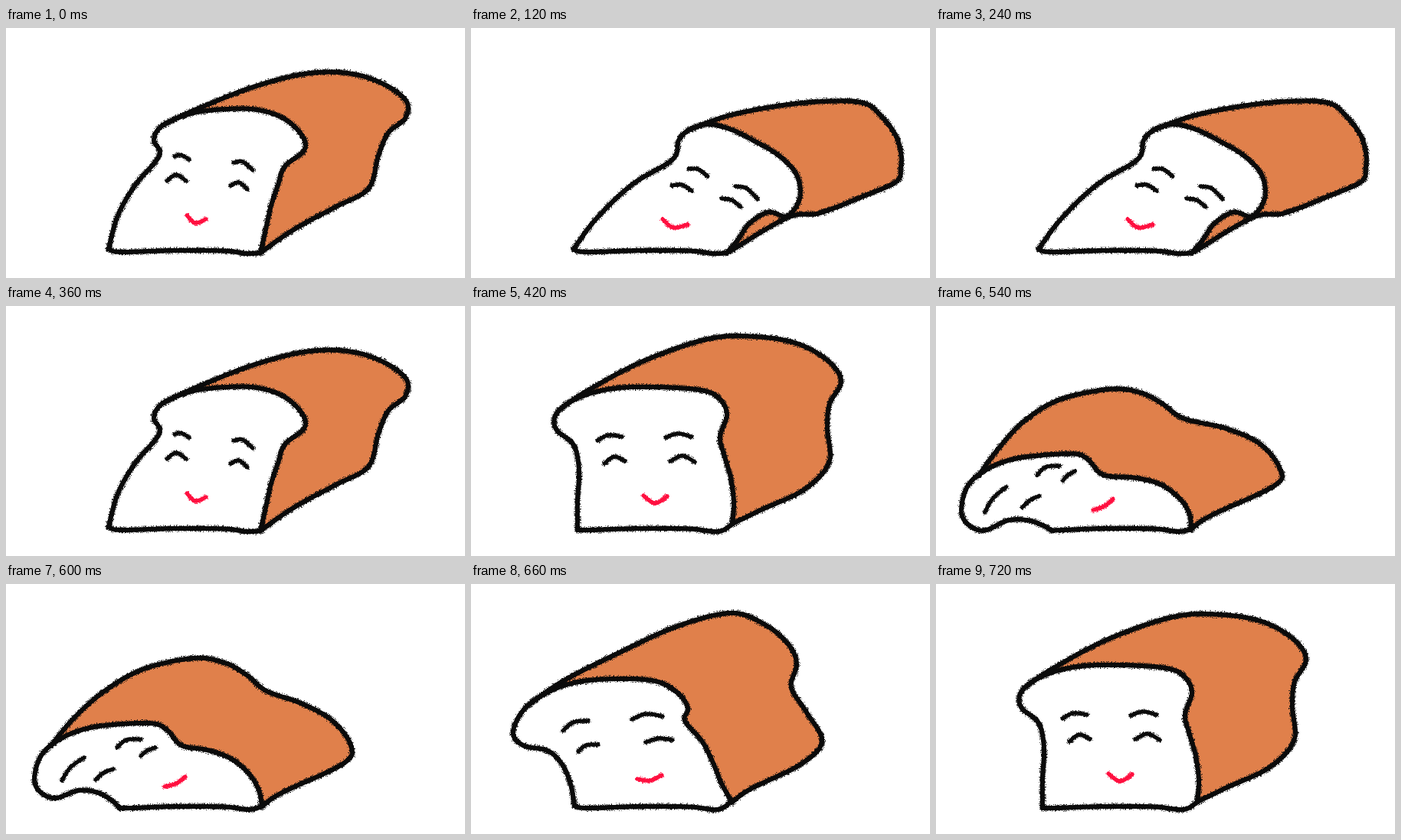
Animation of 599x327 px, one loop 0.78 s. Source, as an HTML page with a canvas:

```html
<!DOCTYPE html>
<html>
<head>
<meta charset="utf-8">
<style>
html, body { margin: 0; width: 100%; height: 100%; overflow: hidden; background: #fff; }
canvas { display: block; }
</style>
</head>
<body>
<canvas id="stage" width="599" height="327"></canvas>
<script>
const ctx = document.getElementById('stage').getContext('2d');
const STEP = 60, INK = '#0b0b0b', CRUST = '#e0804b', LIPS = '#ff1040';

// Every pose has the same points: slice edge, crust edge, then brows, eyes and mouth.
const right = {
  slice: [134,289, 146,245, 169,205, 200,167, 193,146, 205,127, 245,111, 290,106, 328,107,
    362,118, 386,140, 389,160, 364,181, 355,205, 346,232, 339,263, 332,294],
  crust: [205,127, 240,110, 320,78, 390,60, 445,59, 490,72, 522,95, 521,118, 499,137,
    486,167, 473,210, 430,234, 375,264, 332,294],
  marks: [220,168, 228,166, 239,172, 297,176, 309,175, 322,186, 210,200, 222,192, 235,200,
    293,206, 304,202, 315,211, 236,245, 247,255, 261,250]
};
const farRight = {
  slice: [134,289, 163,250, 210,205, 263,172, 271,147, 285,133, 310,126, 340,133, 372,149,
    402,167, 425,192, 429,222, 413,246, 388,241, 363,256, 349,276, 334,294],
  crust: [285,133, 335,115, 400,102, 460,96, 512,98, 536,116, 554,140, 561,163, 561,182,
    555,201, 512,220, 455,242, 413,248, 338,292],
  marks: [284,184, 297,185, 309,194, 345,207, 360,210, 374,224, 262,206, 275,205, 288,213,
    327,223, 340,225, 352,234, 250,250, 264,261, 283,257]
};
const upright = {
  slice: [139,293, 139,255, 141,215, 134,182, 111,161, 112,140, 140,120, 185,108, 240,106,
    300,110, 324,121, 334,142, 325,171, 331,197, 339,225, 343,257, 341,285],
  crust: [115,136, 150,112, 225,72, 310,43, 370,40, 425,49, 465,71, 483,98, 468,128,
    465,160, 467,205, 435,240, 380,266, 341,285],
  marks: [165,176, 179,169, 197,171, 254,172, 270,167, 288,171, 174,206, 187,197, 201,203,
    260,203, 276,196, 292,204, 225,248, 240,258, 256,249]
};
const left = {
  slice: [135,290, 130,262, 119,236, 100,218, 68,211, 55,193, 73,160, 115,135, 165,125,
    235,126, 268,141, 283,162, 279,179, 301,205, 315,232, 327,261, 340,284],
  crust: [73,160, 120,127, 195,89, 270,55, 340,38, 385,54, 415,80, 425,105, 418,135,
    438,168, 458,206, 430,236, 365,268, 340,286],
  marks: [120,192, 133,181, 153,179, 210,177, 228,170, 250,173, 140,219, 150,211, 166,210,
    228,207, 245,202, 263,204, 217,255, 234,257, 249,250]
};
const farLeft = {
  slice: [148,293, 138,283, 120,273, 95,270, 61,280, 38,262, 45,226, 72,202, 115,187,
    185,182, 209,190, 229,211, 262,217, 293,228, 317,248, 330,270, 334,291],
  crust: [58,212, 90,174, 130,139, 180,111, 245,97, 285,103, 314,119, 340,140, 385,156,
    425,178, 450,211, 440,235, 360,273, 334,291],
  marks: [73,257, 84,240, 102,227, 145,214, 157,204, 176,203, 117,256, 127,247, 140,242,
    176,225, 184,218, 195,214, 207,265, 222,261, 234,252]
};

function blend(a, b, t) {
  const pose = {};
  for (const part in a) pose[part] = a[part].map((v, i) => v + (b[part][i] - v) * t);
  return pose;
}

const towardRight = blend(right, farRight, 0.55);
const peakRight = blend(right, farRight, 1.14);
const peakLeft = blend(left, farLeft, 1.2);
const sway = [right, towardRight, farRight, peakRight, farRight, towardRight, right,
  upright, left, peakLeft, farLeft, left, upright];

// Catmull-Rom spline sampled about once per pixel.
function curve(flat) {
  const pts = [];
  for (let i = 0; i < flat.length; i += 2) pts.push([flat[i], flat[i + 1]]);
  const out = [];
  for (let i = 0; i < pts.length - 1; i++) {
    const p = pts[Math.max(0, i - 1)], a = pts[i], b = pts[i + 1];
    const q = pts[Math.min(pts.length - 1, i + 2)];
    const n = Math.ceil(Math.hypot(b[0] - a[0], b[1] - a[1]));
    for (let k = 0; k < n; k++) {
      const t = k / n;
      out.push([0, 1].map(d => a[d] + 0.5 * t * (b[d] - p[d] +
        t * (2 * p[d] - 5 * a[d] + 4 * b[d] - q[d] + t * (3 * (a[d] - b[d]) + q[d] - p[d])))));
    }
  }
  out.push(pts[pts.length - 1]);
  return out;
}

let seed;
function random() {
  seed = (seed * 1664525 + 1013904223) % 4294967296;
  return seed / 4294967296;
}

function trace(line) {
  ctx.beginPath();
  line.forEach(([x, y]) => ctx.lineTo(x, y));
}

function fill(line, color) {
  trace(line);
  ctx.fillStyle = color;
  ctx.fill();
}

function crayon(line, width, color) {
  trace(line);
  ctx.lineWidth = width * 0.72;
  ctx.strokeStyle = ctx.fillStyle = color;
  ctx.stroke();
  for (const [x, y] of line) {
    for (let i = 0; i < 5; i++) {
      const angle = random() * Math.PI * 2;
      const reach = width * (0.3 + 0.28 * random());
      ctx.globalAlpha = 0.35 + 0.6 * random();
      ctx.fillRect(Math.round(x + reach * Math.cos(angle) - 0.5),
        Math.round(y + reach * Math.sin(angle) - 0.5), 1, 1);
    }
  }
  ctx.globalAlpha = 1;
}

function draw({ slice, crust, marks }) {
  seed = 7;
  ctx.fillStyle = '#fff';
  ctx.fillRect(0, 0, 599, 327);
  ctx.lineCap = ctx.lineJoin = 'round';

  const [endX, endY] = slice.slice(-2);
  const base = curve([slice[0], slice[1], slice[0] + 16, 293, 220, 291, 285, 291.5,
    endX - 18, 295, endX, endY]);
  const edge = curve(slice), back = curve(crust);
  fill(back, CRUST);
  fill([...edge, ...base.slice().reverse()], '#fff');
  [back, edge, base].forEach(line => crayon(line, 8.5, INK));

  for (let i = 0; i < marks.length; i += 6) {
    crayon(curve(marks.slice(i, i + 6)), 7, i < 24 ? INK : LIPS);
  }
}

let shown = -1;
function tick() {
  const index = Math.floor(performance.now() / STEP) % sway.length;
  if (index !== shown) draw(sway[shown = index]);
  requestAnimationFrame(tick);
}
tick();
</script>
</body>
</html>
```
